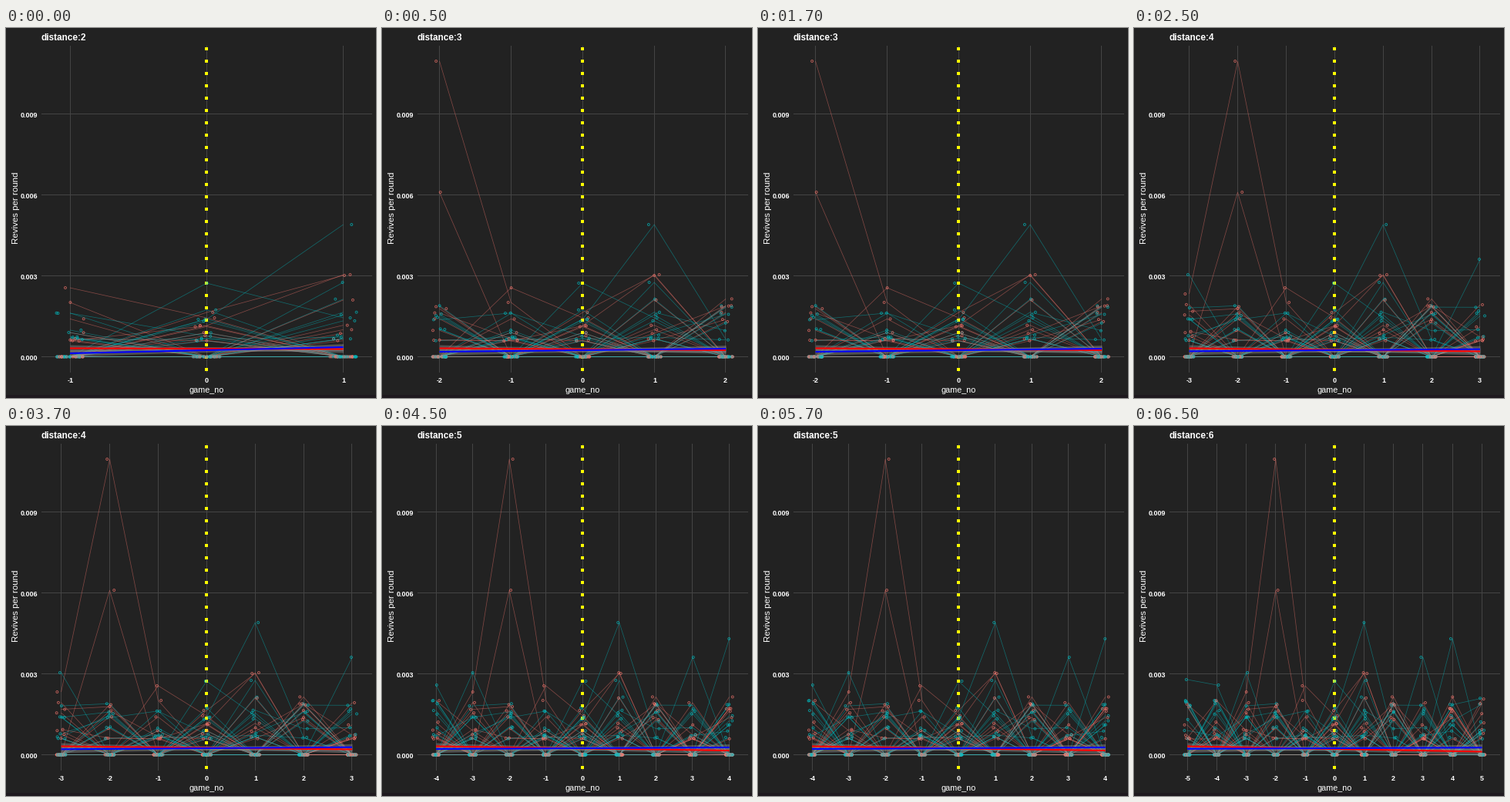
Recreate the animation shown at these times as a matplotlib script. Size 480 px wide and 480 px high, loop 8 s.

```python
import math
import numpy as np
import matplotlib.pyplot as plt
from matplotlib.animation import FuncAnimation
from matplotlib.collections import LineCollection
from matplotlib.patches import Rectangle

SIZE, DPI = 480, 100
PX = 72 / DPI
BACK, GRID, STRIP = "#222222", "#444444", "#1e191e"
RED, TEAL = "#f8766d", "#00bfc4"
LEFT, RIGHT, TOP, BOTTOM, MID = 46, 475, 23, 447, 260.28
ZERO, UNIT = 426.5, 35          # baseline and pixels per 0.001
REACH = 5                       # games on each side at the widest view
COLORS = [RED, TEAL] * 32

# Players who stand out: colour, first game, heights on the stage.
STANDOUTS = [
    (RED, -3, [345, 43, 356]), (RED, -2, [213]), (RED, -1, [337, 376]),
    (RED, 0, [386, 320]), (RED, 0, [369, 321]),
    (TEAL, -5, [329, 336]), (TEAL, -3, [320]), (TEAL, 0, [331, 376]),
    (TEAL, 0, [378, 255, 404]), (TEAL, 1, [330]), (TEAL, 3, [300]),
    (TEAL, 4, [276]),
]


def build_heights():
    """One row per player, one column per game; most scores are zero."""
    rng = np.random.default_rng(12)
    heights = np.full((len(COLORS), 2 * REACH + 1), ZERO)
    for column in heights.T:
        for color, count in ((0, 7), (1, 8)):
            scorers = rng.choice(np.arange(color, len(COLORS), 2), count, replace=False)
            column[scorers] = 406 - 55 * rng.random(count) ** 1.8
    for player, (color, first, ys) in enumerate(STANDOUTS):
        row = 2 * player + COLORS.index(color)
        start = first + REACH
        heights[row, max(start - 1, 0):start + len(ys) + 1] = ZERO
        heights[row, start:start + len(ys)] = ys
    return heights


HEIGHTS = build_heights()

fig = plt.figure(figsize=(SIZE / DPI, SIZE / DPI), dpi=DPI, facecolor=BACK)
ax = fig.add_axes([0, 0, 1, 1])


def label(x, y, text, size, **style):
    ax.text(x, y, text, fontsize=size * PX, family="Liberation Sans",
            color="white", **style)


def box(x, y, width, height, color, zorder=1):
    ax.add_patch(Rectangle((x, y), width, height, color=color, lw=0, zorder=zorder))


def draw_scales(distance, step):
    box(0, 476, SIZE, 4, STRIP)
    for k in range(4):
        y = math.floor(ZERO - 3 * k * UNIT)
        box(LEFT, y, RIGHT - LEFT, 1, GRID)
        label(41.5, y + 1.5, f"{0.003 * k:.3f}", 9, weight="bold",
              ha="right", va="center_baseline")
    for game in range(-distance, distance + 1):
        x = math.floor(MID + game * step)
        box(x, TOP, 1, BOTTOM - TOP, GRID)
        label(x + 0.5, 460, game, 9, weight="bold", ha="center", va="baseline")
    label(46, 16, f"distance:{distance + 1}", 11.8, weight="bold", va="baseline")
    label(260, 473, "game_no", 10.7, ha="center", va="baseline")
    label(18, 233.5, "Revives per round", 11.5, rotation=90, ha="right", va="center")
    for y in range(25, 442, 16):
        box(258, y, 4, 4, "yellow", zorder=3)


def draw_players(distance, step):
    rng = np.random.default_rng(distance)
    games = np.arange(-distance, distance + 1)
    xs = MID + games * step
    ys = HEIGHTS[:, games + REACH]
    ax.add_collection(LineCollection(
        [np.column_stack([xs, row]) for row in ys], colors=COLORS,
        linewidths=0.75 * PX, alpha=0.45, snap=False, zorder=2))
    jitter = rng.uniform(-0.1, 0.1, ys.shape) * step
    ax.scatter((xs + jitter).ravel(), ys.ravel(), s=(2.9 * PX) ** 2,
               facecolors="none", edgecolors=np.repeat(COLORS, len(games)),
               linewidths=0.95 * PX, alpha=0.7, zorder=4)


def draw_trend(color, start, end, left, right):
    t = np.linspace(-1, 1, 41)
    xs = np.linspace(left, right, t.size)
    ys = np.linspace(start, end, t.size)
    half = 2.5 + 2 * t ** 2
    ax.fill_between(xs, ys - half, ys + half, color="#999999",
                    alpha=0.4, lw=0, zorder=5)
    ax.plot(xs, ys, color=color, lw=2.1 * PX, solid_capstyle="butt",
            snap=False, zorder=6)


def update(frame):
    distance = 1 + (frame + 3) // 4
    step = (RIGHT - LEFT) / 2 / (1.1 * (distance + 0.1))
    ends = MID - distance * step, MID + distance * step
    ax.clear()
    ax.axis("off")
    ax.set(xlim=(0, SIZE), ylim=(SIZE, 0))
    draw_scales(distance, step)
    draw_players(distance, step)
    draw_trend("red", 415.5, 415 + 1.5 * distance, *ends)
    draw_trend("blue", 418 + 4 / distance, 418 - 4 / distance, *ends)
    return []


animation = FuncAnimation(fig, update, frames=16, init_func=lambda: [],
                          interval=500, repeat=True, blit=False)
plt.show()
```
